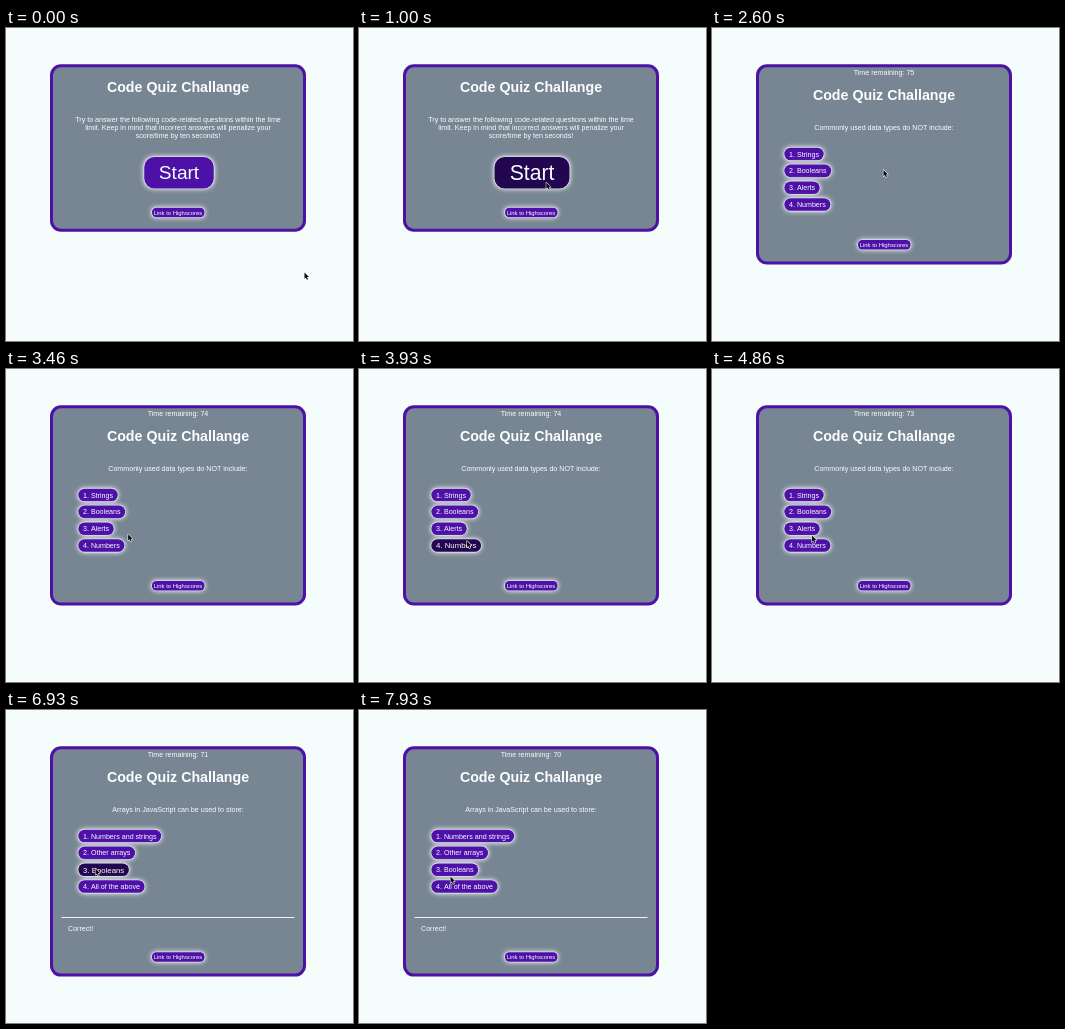
These frames come from a looping animation (347 by 313 pixels, 8000 ms). An HTML page with a canvas:

```html
<!DOCTYPE html>
<html lang="en">
<head>
<meta charset="utf-8">
<title>Code Quiz</title>
<style>
  html, body { margin: 0; width: 100%; height: 100%; overflow: hidden; background: #f5fcfc; }
  canvas { display: block; }
</style>
</head>
<body>
<canvas id="stage" width="347" height="313"></canvas>
<script>
const ctx = document.getElementById('stage').getContext('2d');
const LOOP = 8000, PRESS = 1980, BEGIN = 2300, ANSWER = 6450;
const CENTER = 172, REM = 7.11;
const PAGE = '#f5fcfc', SLATE = '#778692', PURPLE = '#4d11a8', DARK = '#22064f', WHITE = '#fcfdfe';

const intro = [
  'Try to answer the following code-related questions within the time',
  'limit. Keep in mind that incorrect answers will penalize your',
  'score/time by ten seconds!'
];
const questions = [
  { ask: 'Commonly used data types do NOT include:',
    options: ['1. Strings', '2. Booleans', '3. Alerts', '4. Numbers'] },
  { ask: 'Arrays in JavaScript can be used to store:',
    options: ['1. Numbers and strings', '2. Other arrays', '3. Booleans', '4. All of the above'] }
];

// Pointer moves: start, end, destination x and y
const moves = [
  [60, 1250, 173, 143],
  [2080, 2500, 171.5, 142],
  [2800, 3750, 108, 172],
  [4450, 5350, 89.5, 159.5],
  [5900, 6300, 89.5, 158.5],
  [7250, 7880, 91.5, 166.6]
];

function pointerAt(t) {
  let x = 298.5, y = 244.5;
  for (const [from, to, tx, ty] of moves) {
    const p = Math.min(1, Math.max(0, (t - from) / (to - from)));
    const e = p * p * (3 - 2 * p);
    x += (tx - x) * e;
    y += (ty - y) * e;
  }
  return { x, y };
}

function setFont(size, weight = 'normal') {
  ctx.font = `${weight} ${size}px "Liberation Sans", Arial, Helvetica, sans-serif`;
}

function text(str, x, y, size = REM, align = 'center', weight) {
  setFont(size, weight);
  ctx.textAlign = align;
  ctx.fillStyle = WHITE;
  ctx.fillText(str, x, y);
}

function box(x, y, w, h, r, color) {
  ctx.fillStyle = color;
  ctx.beginPath();
  ctx.roundRect(x, y, w, h, r);
  ctx.fill();
}

function glowBox(x, y, w, h, r, color) {
  ctx.save();
  ctx.shadowColor = '#fff';
  ctx.shadowBlur = 5;
  box(x - 0.6, y - 0.6, w + 1.2, h + 1.2, r + 0.6, '#e9e6f2');
  ctx.restore();
  box(x, y, w, h, r, color);
}

const inside = (p, x, y, w, h) => p.x >= x && p.x <= x + w && p.y >= y && p.y <= y + h;

function card(bottom) {
  box(44, 36.3, 256, bottom - 36.3, 11, PURPLE);
  box(47, 39.3, 250, bottom - 42.3, 8, SLATE);
}

function scoreLink(y) {
  glowBox(146, y - 4.7, 52.5, 9.4, 4.2, PURPLE);
  text('Link to Highscores', CENTER, y + 2.1, 5.92);
}

function startButton(p, focused) {
  const hover = inside(p, 138, 129, 70, 31.5);
  const w = hover ? 75 : 69.5;
  const x = 173 - w / 2;
  glowBox(x, 129, w, 31.5, 10, hover ? DARK : PURPLE);
  if (focused) {
    ctx.lineWidth = 2.6;
    ctx.strokeStyle = 'rgba(190,220,250,0.75)';
    ctx.strokeRect(x - 0.8, 128.2, w + 1.6, 33);
    ctx.lineWidth = 1.2;
    ctx.strokeStyle = '#5b9de6';
    ctx.strokeRect(x - 0.4, 128.6, w + 0.8, 32.2);
  }
  text('Start', 173, hover ? 151.9 : 151.3, hover ? 21.2 : 19.1);
}

function option(label, y, p) {
  setFont(REM);
  let w = ctx.measureText(label).width + 9.4;
  const hover = inside(p, 72.3, y - 6.3, w, 12.6);
  const size = hover ? REM * 1.1 : REM;
  setFont(size);
  w = ctx.measureText(label).width + 9.4;
  glowBox(72.3, y - 6.3, w, 12.6, 6.3, hover ? DARK : PURPLE);
  text(label, 77, y + (hover ? 2.8 : 2.5), size, 'left');
}

function arrow({ x, y }) {
  ctx.save();
  ctx.translate(x, y);
  ctx.beginPath();
  const shape = [[0, 0], [0, 6.3], [1.4, 5], [2.4, 7.3], [3.5, 6.8], [2.5, 4.6], [4.4, 4.5]];
  for (const [px, py] of shape) ctx.lineTo(px, py);
  ctx.closePath();
  ctx.lineJoin = 'round';
  ctx.lineWidth = 1.1;
  ctx.strokeStyle = '#f4f4f6';
  ctx.stroke();
  ctx.fillStyle = '#0a0a0c';
  ctx.fill();
  ctx.restore();
}

function introScreen(t, p) {
  card(203.7);
  text('Code Quiz Challange', CENTER, 64.3, REM * 2, 'center', 'bold');
  intro.forEach((line, i) => text(line, CENTER, 93.6 + i * 8, REM));
  startButton(p, t >= PRESS);
  scoreLink(184.5);
}

function quizScreen(t, p) {
  const answered = t >= ANSWER;
  const { ask, options } = questions[answered ? 1 : 0];
  card(answered ? 266.6 : 236.5);
  text('Time remaining: ' + (75 - Math.floor((t - BEGIN) / 1000)), CENTER, 47.4);
  text('Code Quiz Challange', CENTER, 72.3, REM * 2, 'center', 'bold');
  text(ask, CENTER, 101.7);
  options.forEach((label, i) => option(label, 126 + i * 16.85, p));
  if (answered) {
    ctx.fillStyle = '#f0f3f5';
    ctx.fillRect(55.5, 207, 233, 1);
    text('Correct!', 62, 220.6, REM, 'left');
  }
  scoreLink(answered ? 247 : 216.7);
}

function draw(now) {
  const t = now % LOOP;
  const p = pointerAt(t);
  ctx.fillStyle = PAGE;
  ctx.fillRect(0, 0, 347, 313);
  (t < BEGIN ? introScreen : quizScreen)(t, p);
  arrow(p);
}

let origin;
function tick(now) {
  origin ??= now;
  draw(now - origin);
  requestAnimationFrame(tick);
}
draw(0);
requestAnimationFrame(tick);
</script>
</body>
</html>
```
